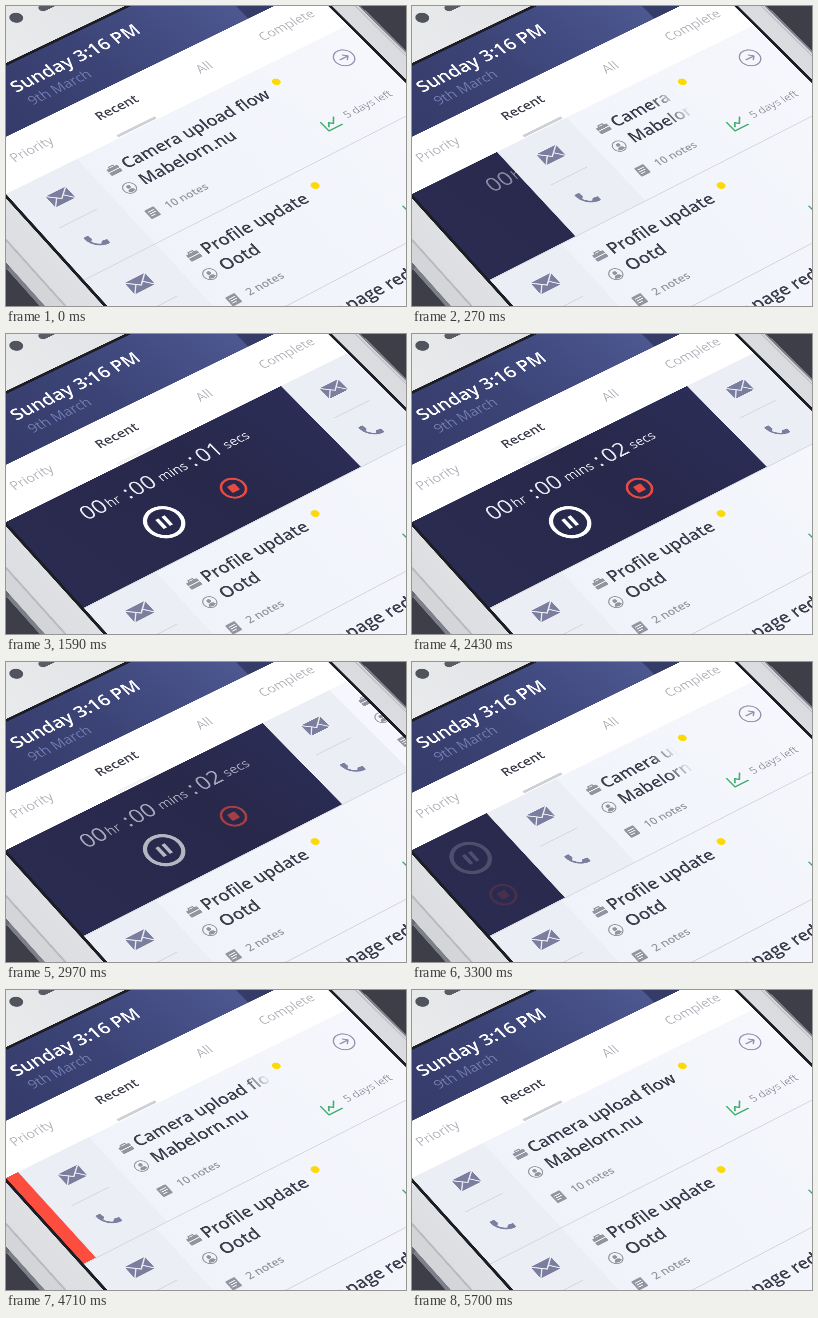
Recreate the animation shown at these times as an HTML page. Size 400 by 300 pixels, loop 5730 ms.

```html
<!DOCTYPE html>
<html lang="en">
<head>
<meta charset="utf-8">
<title>Task timer</title>
<style>
html, body { margin: 0; width: 100%; height: 100%; overflow: hidden; }
#stage { position: relative; width: 100%; height: 100%; overflow: hidden; contain: strict; background: #3d3e48; }
svg {
  position: absolute; left: 0; top: 0; width: 400px; height: 300px; overflow: visible;
  transform-origin: 0 0;
  transform: matrix3d(.9165,-.4332,0,.0001068, .6583,.6995,0,-.000145, 0,0,1,0, 0,188,0,1);
  font-family: "Open Sans", "Noto Sans", sans-serif;
}
.title { font-size: 17px; font-weight: 600; fill: #3b3d4b; }
.small { font-size: 11.2px; font-weight: 600; fill: #96989f; }
.tab { font-size: 13.7px; fill: #b4b6bd; }
.big { font-size: 22px; }
.unit { font-size: 13.5px; }
.timer { fill: #e9eaf3; text-anchor: middle; }
.line { fill: none; stroke-linecap: round; stroke-linejoin: round; }
</style>
</head>
<body>
<div id="stage"></div>
<script>
const ROW = 117, WIDTH = 388, STRIP = 78, OPEN = 310;

const rect = (x, y, w, h, fill, extra = '') =>
  `<rect x="${x}" y="${y}" width="${w}" height="${h}" fill="${fill}" ${extra}/>`;
const text = (x, y, cls, s, extra = '') => `<text x="${x}" y="${y}" class="${cls}" ${extra}>${s}</text>`;
const line = (d, color, width = 1) =>
  `<path class="line" d="${d}" stroke="${color}" stroke-width="${width}"/>`;
const ring = (r, color, width, fill = 'none') =>
  `<circle r="${r}" fill="${fill}" stroke="${color}" stroke-width="${width}"/>`;
const at = (x, y, body, extra = '') => `<g transform="translate(${x} ${y})" ${extra}>${body}</g>`;
const gradient = (id, axis, ...stops) =>
  `<linearGradient id="${id}" gradientUnits="userSpaceOnUse" ${axis}>` +
  stops.map(([o, c]) => `<stop offset="${o}" stop-color="${c}"/>`).join('') + '</linearGradient>';

const GREY = '#92949f', INK = '#7b7e9f';
const mail = rect(-11, -7.5, 22, 15, INK, 'rx="1"') +
  line('M-10.5-7L0 2L10.5-7M-10.5 7L-3.5-1M10.5 7L3.5-1', '#eceef5', 1.2);
const phone = `<path fill="${INK}" transform="scale(.95) translate(-12 -12)" d="M6.6 10.8c1.4 2.8 3.8 5.1 6.6 6.6l2.2-2.2c.3-.3.7-.4 1-.2 1.1.4 2.3.6 3.6.6.6 0 1 .4 1 1V20c0 .6-.4 1-1 1C10.6 21 3 13.4 3 4c0-.6.4-1 1-1h3.5c.6 0 1 .4 1 1 0 1.2.2 2.4.6 3.6.1.3 0 .7-.3 1z"/>`;
const briefcase = rect(-6, -4, 12, 8.5, GREY, 'rx="1"') +
  line('M-2.5-4V-5.5H2.5V-4', GREY, 1.2) + line('M-6 0H6', '#f1f4fa');
const person = ring(6.2, GREY, 1) + `<circle cy="-1.5" r="2" fill="${GREY}"/>` +
  `<path d="M-3.5 4Q-3 1 0 1T3.5 4Q0 6-3.5 4" fill="${GREY}"/>`;
const note = rect(-5.2, -5.7, 10.4, 11.4, GREY, 'rx="1"') + line('M-3-2.5H3M-3 0H3M-3 2.5H1', '#f1f4fa');
const chart = line('M-7-6V6H8', '#43ad72', 1.5) + line('M-4 2L-1-2L2 1L7-5', '#43ad72', 1.5);
const arrow = ring(9.8, '#9391b0', 1.3) + line('M-4.5 0H4.5M1-3.5L4.5 0L1 3.5', '#9391b0', 1.4);
const stop = ring(11.2, '#e84b43', 2.4) + rect(-4.2, -4.2, 8.4, 8.4, '#e84b43', 'rx="1"');
const bars = rect(-5.2, -6.2, 3.6, 12.4, '#fff') + rect(1.6, -6.2, 3.6, 12.4, '#fff');
const wheel = ring(17, '#fff', 3.8);

const icons = at(98.500, 28.5, briefcase) + at(97.5, 52.5, person) + at(97.5, 86.500, note);
const actions = rect(0, 0, STRIP, ROW - 1, '#eceef5') + at(39, 28.5, mail) + at(36.5, 86, phone) +
  rect(17, 56.5, 41, 1, '#d6d8df');
const labels = (title, client, notes) =>
  text(109, 33.5, 'title', title) + text(111, 57, 'title', client) + text(112, 90.500, 'small', notes);
const extras = dot => `<circle cx="${dot}" cy="21" r="4" fill="#fcd90a"/>` +
  at(359.5, 30.5, arrow) + at(298.5, 87.5, chart) +
  text(315, 90.5, 'small', '5 days left', 'style="font-weight:400;font-size:11.3px"');
const base = rect(0, 0, WIDTH, ROW, 'url(#paper)') + rect(0, ROW - 1, WIDTH, 1, '#d6d9e0');
const row = (n, dot, ...words) => at(0, n * ROW, base + extras(dot) + actions + icons + labels(...words));

const units = [[74.6, '00'], [95.5, 'hr'], [112, ':'], [129, '00'], [162, 'mins'], [185, ':'], [204, '00'], [234, 'secs']];
const clock = units.map(([x, s], i) => {
  const big = /[0:]/.test(s);
  return text(x, big ? 37 : 35.5, 'timer ' + (big ? 'big' : 'unit'), s, i == 6 ? 'id="secs"' : '');
}).join('');

document.getElementById('stage').innerHTML = `
<svg>
<defs>
  ${gradient('head', 'x1="20" x2="313" y1="-60" y2="-100"', [0, '#343a67'], [.5, '#3c4477'], [1, '#4d5891'])}
  ${gradient('paper', 'x1="78" x2="388"', [0, '#f0f3fa'], [1, '#f5f7fc'])}
  ${gradient('night', 'x1="0" x2="310" y1="90" y2="20"', [0, '#2a2b50'], [.6, '#28284b'], [1, '#2b2d56'])}
  ${gradient('body', 'x1="-31" x2="410"', [0, '#dcdee1'], [.3, '#e9eaec'], [1, '#dadbdf'])}
  <linearGradient id="fade" gradientUnits="userSpaceOnUse" x1="246" x2="273">
    <stop offset="0" stop-color="#fff"/><stop id="fadeEnd" offset="1" stop-color="#fff"/>
  </linearGradient>
  <mask id="cut" maskUnits="userSpaceOnUse" x="0" y="0" width="800" height="117">${rect(0, 0, 800, ROW, 'url(#fade)')}</mask>
  <clipPath id="rowClip">${rect(0, 0, WIDTH, ROW, '#fff')}</clipPath>
  <clipPath id="panelClip"><rect id="panelBox" height="116"/></clipPath>
</defs>
${rect(-50, -260, 464, 700, '#7d8089')}
${rect(-46, -260, 458, 700, '#d3d5d9')}
${rect(-55, 45, 9, 26, '#686a74', 'rx="3"')}
${rect(-32, -260, 442, 700, '#b9bbc1')}
${rect(-30, -260, 439, 700, 'url(#body)')}
<circle cx="133" cy="-169" r="6.3" fill="#51535d"/>
${rect(157, -170, 60, 8, '#5a5c65', 'rx="4"')}
${rect(-3, -128, 394, 560, '#1d1e25')}
${rect(0, -125, WIDTH, 70, 'url(#head)')}
${rect(315, -125, 73, 70, '#363c68')}
${text(78.5, -93, '', 'Sunday 3:16 PM', 'font-size="18.7" font-weight="600" fill="#fff"')}
${text(82, -73, '', '9th March', 'font-size="14.3" fill="#717ab0"')}
${rect(0, -55, WIDTH, 55, '#fff')}
${text(28, -26, 'tab', 'Priority', 'style="font-size:13.2px"')}
${text(122.5, -26, 'tab', 'Recent', 'style="font-weight:600;fill:#3b3d4b"')}
${text(235, -23.5, 'tab', 'All')}
${text(309, -25, 'tab', 'Complete')}
${rect(125, -4, 43, 3, '#cfd1d7')}
<rect id="cover" y="-5" height="5" fill="#fff" opacity=".75"/>
${row(2, 330, 'Identity page redesign', 'Studio', '4 notes')}
${row(1, 240, 'Profile update', 'Ootd', '2 notes')}
<g clip-path="url(#rowClip)">
  ${base}
  <g id="fixed">${extras(288)}</g>
  <g mask="url(#cut)"><g class="slide">${labels('Camera upload flow', 'Mabelorn.nu', '10 notes')}</g></g>
  <g clip-path="url(#panelClip)">
    ${rect(0, 0, OPEN, ROW, 'url(#night)')}
    <g id="wide">${clock}
      ${at(119.3, 74.6, wheel + `<path id="play" fill="#fff" d="M-5-7V7L8 0Z"/><g id="pause">${bars}</g>`)}
      ${at(196.5, 75.5, stop)}
    </g>
    <g id="narrow">${at(38.8, 35, wheel + bars)}${at(38, 84.7, stop)}</g>
    ${rect(0, 0, OPEN, ROW, '#fd4d3e', 'id="red"')}
  </g>
  <g class="slide">${actions}${icons}</g>
</g>
</svg>`;

const $ = id => document.getElementById(id);
const slides = document.querySelectorAll('.slide');
const span = (t, from, to) => Math.min(1, Math.max(0, (t - from) / (to - from)));
const ease = p => p < .5 ? 4 * p ** 3 : 1 - 4 * (1 - p) ** 3;
const show = (id, amount) => $(id).setAttribute('opacity', amount);

function draw(now) {
  const t = now % 5730;
  const x = OPEN * ease(span(t, 30, 600)) - (OPEN - STRIP) * ease(span(t, 2800, 3400)) -
    STRIP * ease(span(t, 4320, 4920));

  slides.forEach(g => g.setAttribute('transform', `translate(${x} 0)`));
  $('panelBox').setAttribute('width', x);
  $('cover').setAttribute('width', x);
  $('fadeEnd').setAttribute('stop-opacity', 1 - span(x, 0, 12));
  show('fixed', 1 - span(x, 160, 240));
  show('wide', span(t, 120, 420) * (1 - span(t, 2800, 3300)));
  show('narrow', span(t, 3250, 3550));
  show('red', span(t, 4200, 4350));

  const running = t >= 750;
  show('play', running ? 0 : 1);
  show('pause', running ? 1 : 0);
  $('secs').textContent = '0' + (t < 1350 ? 0 : t < 2350 ? 1 : 2);
  requestAnimationFrame(draw);
}
requestAnimationFrame(draw);
</script>
</body>
</html>
```
